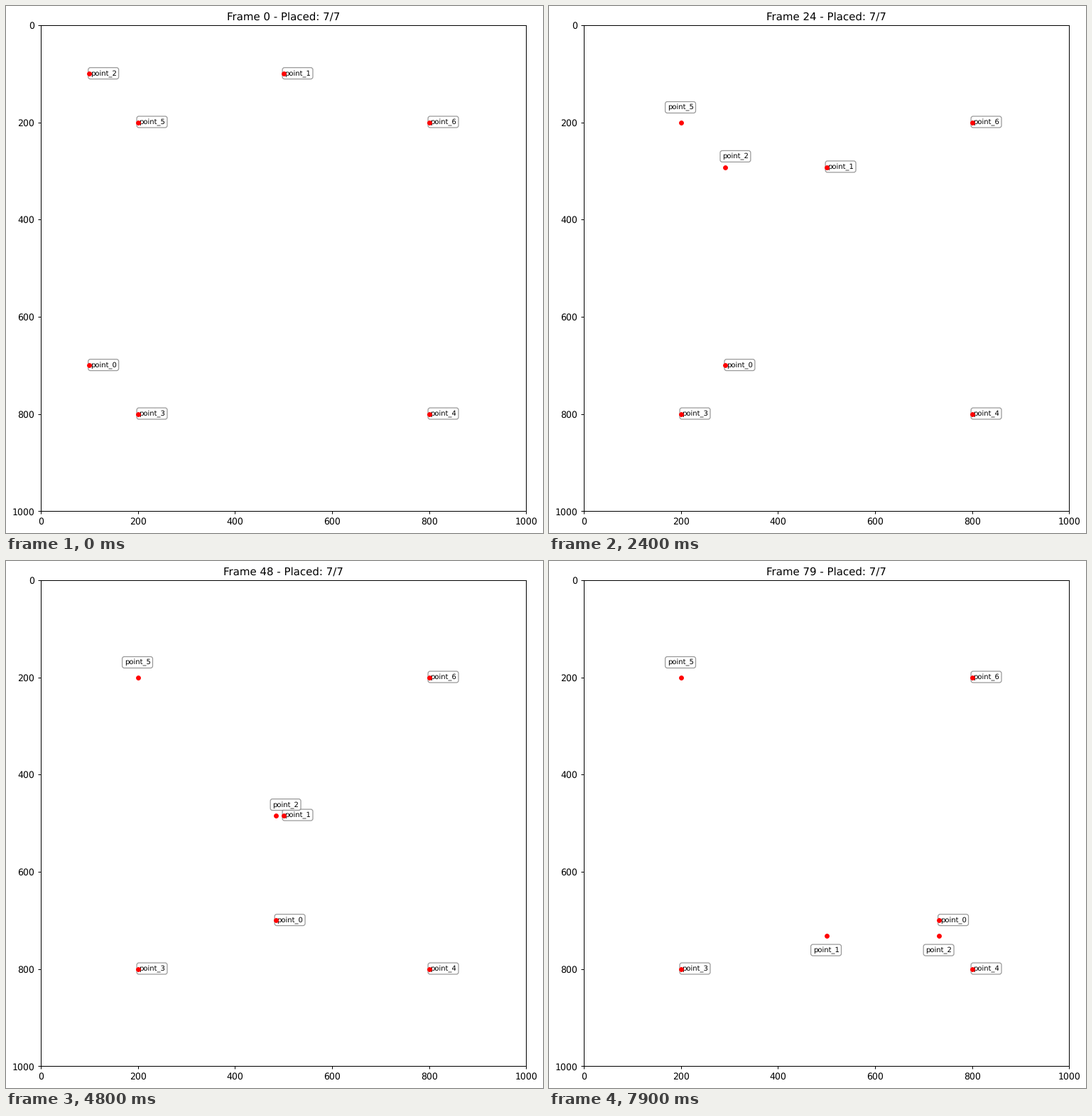
These frames come from a looping animation (756 px wide and 741 px high, 8000 ms). A matplotlib script:

```python
import matplotlib.pyplot as plt
import numpy as np
from matplotlib.animation import FuncAnimation

W, H, DPI = 756, 741, 90
LEFT, TOP, SIDE = 48.9, 27.0, 683.4
FRAMES, INTERVAL = 80, 100

START = np.array([(100, 700), (500, 100), (100, 100), (200, 800),
                  (800, 800), (200, 200), (800, 200)], float)
VELOCITY = np.zeros_like(START)
VELOCITY[:3] = 8 * np.array([(1, 0), (0, 1), (1, 1)])
COUNT = len(START)

# label centres lie on a circle around their point, y pointing down
ANGLES = np.radians([0, 45, 90, -90])
OFFSETS = 30 * np.column_stack([np.cos(ANGLES), -np.sin(ANGLES)])
HALF = np.array([27, 5])       # half size of a label's core
NUDGE = np.array([-0.8, -1.0])


def points_at(step):
    return START + VELOCITY * step


def hits(center, others, reach):
    return np.any(np.all(np.abs(others - center) < reach, axis=1))


def settle(points, sides):
    """Turn each label covering a foreign point to its next free side."""
    sides = list(sides)
    for k in range(COUNT):
        rest = np.arange(COUNT) != k
        if not hits(points[k] + OFFSETS[sides[k]], points[rest], HALF):
            continue
        labels = (points + OFFSETS[sides])[rest]
        for turn in range(1, len(OFFSETS)):
            side = (sides[k] + turn) % len(OFFSETS)
            center = points[k] + OFFSETS[side]
            if not (hits(center, points[rest], HALF)
                    or hits(center, labels, 2 * HALF)):
                sides[k] = side
                break
    return sides


history = [[0] * COUNT]
for step in range(1, FRAMES):
    history.append(settle(points_at(step), history[-1]))

plt.rcParams.update({"font.family": "DejaVu Sans", "text.hinting": "none"})
fig = plt.figure(figsize=((W + 1e-6) / DPI, (H + 1e-6) / DPI), dpi=DPI,
                 facecolor="white")
ax = fig.add_axes([LEFT / W, 1 - (TOP + SIDE) / H, SIDE / W, SIDE / H])
ax.set_xlim(0, 1000)
ax.set_ylim(1000, 0)
title = ax.set_title("")

dots = ax.scatter(*START.T, s=20, color="red", zorder=5)
box = dict(boxstyle="round,pad=0.3", facecolor="white",
           edgecolor="gray", alpha=0.8)
texts = [ax.text(0, 0, f"point_{k}", fontsize=8, ha="center", va="center",
                 bbox=box) for k in range(COUNT)]


def update(step):
    points = points_at(step)
    dots.set_offsets(points)
    for text, spot in zip(texts, points + OFFSETS[history[step]] + NUDGE):
        text.set_position(spot)
    title.set_text(f"Frame {step} - Placed: {COUNT}/{COUNT}")
    return [dots, title, *texts]


anim = FuncAnimation(fig, update, frames=FRAMES, interval=INTERVAL,
                     init_func=lambda: update(0), repeat=True,
                     repeat_delay=0, blit=False)
plt.show()
```
